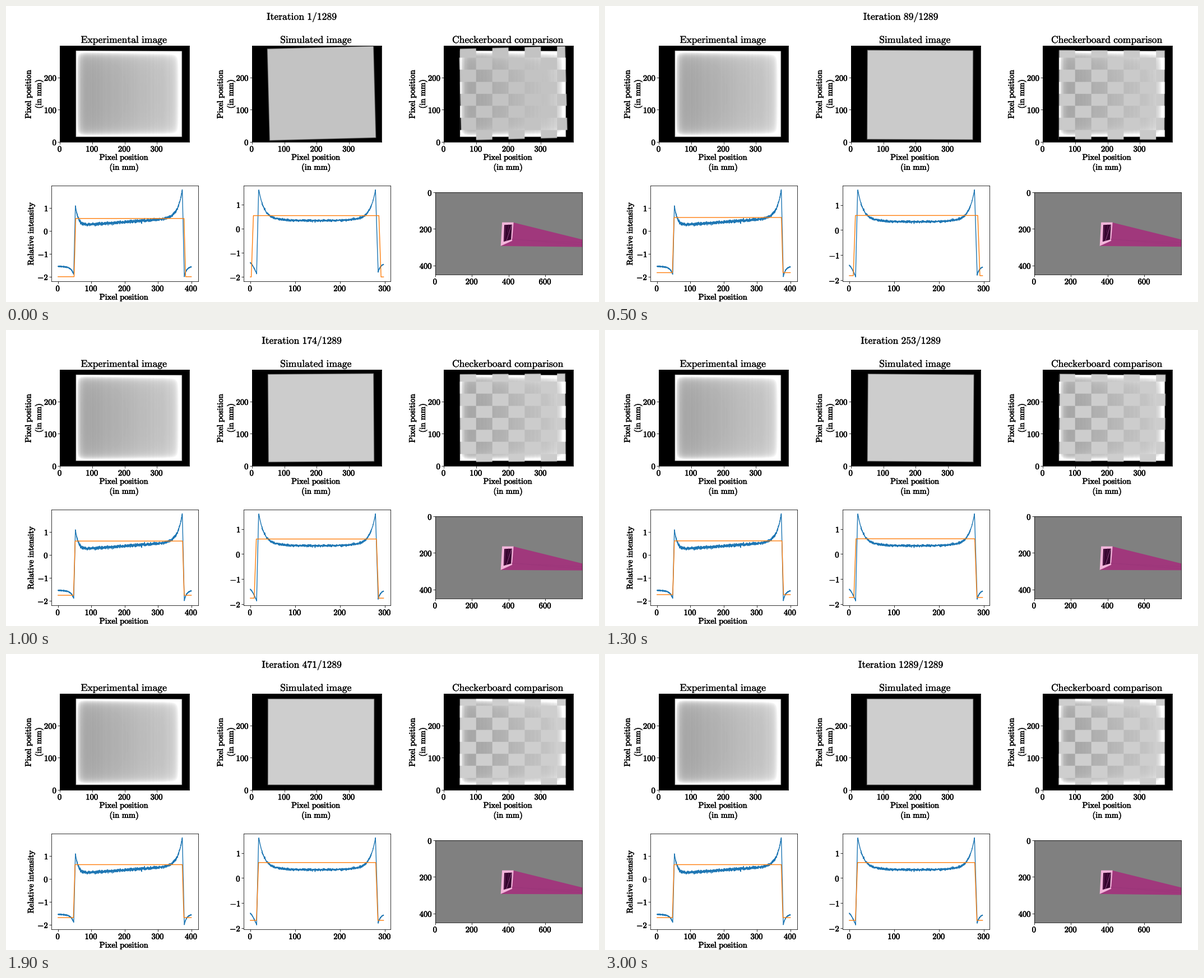
A matplotlib script that plays this animation: 1058 px wide and 529 px high, repeating every 4600 ms.

```python
import numpy as np
import matplotlib.pyplot as plt
from matplotlib.animation import FuncAnimation
from matplotlib.patches import Polygon
from matplotlib.patheffects import withStroke
from matplotlib.ticker import FuncFormatter, MultipleLocator

W, H, DPI = 1058, 529, 92
PT = 72 / DPI                      # points per pixel
BASE, LARGE = 14.65 * PT, 17.6 * PT
plt.rcParams.update({"mathtext.fontset": "cm", "font.size": BASE,
                     "axes.linewidth": 0.8 * PT})

# Pose of the simulated panel in mm, profile edges and profile levels
STEPS = [0, 3, 8, 13, 19]
POSE = {
    "cx": [214.7, 214.3, 211.7, 214.9, 213.0],
    "cy": [150.8, 143.3, 149.4, 148.8, 148.8],
    "w": [328.0, 326.4, 325.5, 326.9, 327.8],
    "h": [283.6, 277.9, 272.7, 270.1, 266.1],
    "tilt": [-0.026, 0.017, -0.016, 0.007, 0.001],
    "left": [50.5, 48.5, 48.5, 49.5, 48.5],
    "right": [380.5, 375.7, 375.5, 377.2, 375.3],
    "top": [4.5, 12.0, 10.0, 12.5, 16.0],
    "bottom": [289.0, 291.5, 284.5, 282.0, 282.0],
    "low": [-2.0, -1.85, -1.78, -1.735, -1.69],
    "high": [0.54, 0.575, 0.595, 0.61, 0.62],
    "gray": [0.763, 0.786, 0.794, 0.802, 0.808],
}
COUNT = ([0, 3, 8, 13, 19, 26, 30], [1, 67, 122, 253, 471, 1039, 1289])
SPAN_X, SPAN_Y = 400, 298
LAST = 30

rng = np.random.default_rng(4)
fig = plt.figure(figsize=(W / DPI, H / DPI), dpi=DPI, facecolor="white")


def tex(s):
    return r"$\mathrm{" + s.replace(" ", r"\ ") + "}$"


def weight(width):
    return [withStroke(linewidth=width * PT, foreground="black")]


def label(x, y, s, size=BASE, **kw):
    opts = dict(ha="center", va="baseline", fontsize=size,
                path_effects=weight(0.6 if size == BASE else 0.35))
    opts.update(kw)
    return fig.text(x / W, 1 - y / H, tex(s), **opts)


def side_label(x, y, s):
    label(x, y, s, rotation=90, va="center")


def thicken_ticks(ax):
    for text in ax.get_xticklabels() + ax.get_yticklabels():
        text.set_path_effects(weight(0.6))


def panel(x0, y0, x1, y1, xstep, ystep):
    ax = fig.add_axes([x0 / W, 1 - y1 / H, (x1 - x0) / W, (y1 - y0) / H])
    number = FuncFormatter(lambda v, _: f"${v:g}$")
    for axis, step in ((ax.xaxis, xstep), (ax.yaxis, ystep)):
        axis.set_major_locator(MultipleLocator(step))
        axis.set_major_formatter(number)
    ax.tick_params(length=3.5 * PT, width=0.8 * PT)
    ax.tick_params(axis="x", pad=2 * PT)
    ax.tick_params(axis="y", pad=1.5 * PT)
    return ax


def image_panel(x0, title, data):
    ax = panel(x0, 71.3, x0 + 230.6, 242.7, 100, 100)
    img = ax.imshow(data, cmap="gray", vmin=0, vmax=1, aspect="auto",
                    extent=(0, SPAN_X, 0, SPAN_Y))
    ax.set_xlim(0, SPAN_X - 0.1)
    thicken_ticks(ax)
    mid = x0 + 114.6
    label(mid, 66, title, LARGE)
    label(mid, 275, "Pixel position")
    label(mid, 292.6, "(in mm)")
    side_label(x0 - 56, 157, "Pixel position")
    side_label(x0 - 37.5, 157, "(in mm)")
    return img


X, Y = np.meshgrid(np.arange(SPAN_X) + 0.5, SPAN_Y - np.arange(SPAN_Y) - 0.5)
row = ((SPAN_Y - Y) // (SPAN_Y / 8)).astype(int)
col = (X // (SPAN_X / 8)).astype(int)
CHECKER = (row + col) % 2 == 1


def inside(d, soft=2.0):
    return np.clip(d / soft + 0.5, 0, 1)


def measured_image():
    top = 282.5 - 0.004 * (X - 50)
    dl, dr, db, dt = X - 50, 377 - X, Y - 16, top - Y
    g = 0.645 + 0.12 * np.clip((X - 80) / 240, 0, 1)
    g += 0.05 * np.abs((Y - 149) / 133) ** 3
    for d, amp, fade in ((dl, 0.45, 9), (dr, 0.5, 12), (db, 0.5, 8), (dt, 0.5, 8)):
        g += amp * np.exp(-np.clip(d, 0, None) / fade)
    stripes = np.repeat(rng.normal(0, 0.004, SPAN_X // 4), 4)
    g = np.clip(g + stripes, 0, 1)
    return g * inside(np.minimum(np.minimum(dl, dr), np.minimum(db, dt)))


def simulated_image(p):
    c, s = np.cos(p["tilt"]), np.sin(p["tilt"])
    dx, dy = X - p["cx"], Y - p["cy"]
    u, v = c * dx - s * dy, s * dx + c * dy
    edge = np.minimum(p["w"] / 2 - np.abs(u), p["h"] / 2 - np.abs(v))
    return p["gray"] * inside(edge, 3.0)


def row_profile(x):
    before = -1.55 - 0.35 * np.exp((x - 47) / 9)
    plate = (0.26 + 0.00105 * (x - 80) + 0.88 * np.exp(-(x - 52) / 8.5)
             + 1.23 * np.exp((x - 373) / 14))
    after = -1.55 - 0.45 * np.exp(-(x - 379) / 7)
    rise = np.interp(x, [47, 52], [-1.9, 1.13])
    fall = np.interp(x, [373, 379], [1.8, -2.0])
    y = np.select([x < 47, x < 52, x < 373, x < 379], [before, rise, plate, fall], after)
    flat = (x > 56) & (x < 365)
    return y + rng.normal(0, 1, x.size) * np.where(flat, 0.03, 0.012)


def column_profile(x):
    def spike(d):
        return 1.15 * np.exp(-d / 11.5) + 0.15 * np.exp(-d / 50)
    before = -1.42 - 0.44 * np.clip(x / 14, 0, 1) ** 1.4
    plate = 0.31 + spike(np.abs(x - 19)) + spike(np.abs(279 - x))
    after = -1.43 - 0.37 * np.exp(-(x - 285) / 6)
    rise = np.interp(x, [14, 18.5], [-1.87, 1.61])
    fall = np.interp(x, [279, 285], [1.61, -1.8])
    y = np.select([x < 14, x < 18.5, x < 279, x < 285], [before, rise, plate, fall], after)
    flat = (x > 26) & (x < 272)
    return y + rng.normal(0, 1, x.size) * np.where(flat, 0.022, 0.01)


def box_line(a, b, end, p):
    xs = [0, a - 2.4, a + 2.4, b - 2.4, b + 2.4, end]
    lo, hi = p["low"], p["high"]
    return xs, [lo, lo, hi, hi, lo, lo]


def plot_panel(x0, profile, end):
    ax = panel(x0, 320.7, x0 + 261.5, 492, 100, 1)
    x = np.linspace(0, end, end * 4)
    y = profile(x)
    ax.plot(x, y, color="C0", lw=1.4 * PT)
    line, = ax.plot([], [], color="C1", lw=1.4 * PT)
    ax.set_xlim(-0.05 * end, 1.05 * end)
    return ax, line, y


measured = measured_image()
image_panel(96.3, "Experimental image", measured)
sim_img = image_panel(438.9, "Simulated image", measured)
mix_img = image_panel(781.3, "Checkerboard comparison", measured)
title = label(528.2, 24.5, "Iteration 1/1289", LARGE)

ax_row, row_line, _ = plot_panel(81, row_profile, 400)
ax_row.set_ylim(-2.2, 1.98)
thicken_ticks(ax_row)
side_label(45, 406.5, "Relative intensity")
label(211, 524.8, "Pixel position")
ax_col, col_line, col_data = plot_panel(424, column_profile, 297)

# 3D preview, laid out in stage pixels
scene = panel(766, 333, 1027.5, 479.7, 200, 200)
scene.set_facecolor("#808080")
scene.set_xlim(0, 799.5)
scene.set_ylim(449.5, 0)
thicken_ticks(scene)


def to_scene(points):
    return [((x - 766) * 800 / 262, (y - 333) * 450 / 147) for x, y in points]


def shape(points, color, **kw):
    patch = Polygon(to_scene(points), closed=True, fc=color, ec="none", **kw)
    return scene.add_patch(patch)


def stroke(points, color, width):
    x, y = zip(*to_scene(points))
    scene.plot(x, y, color=color, lw=width * PT)


beam = shape([(905, 387)] * 4, "#a0387c")
for y in (421, 425):
    stroke([(903, 417), (1029, y + 2)], "#9b367a", 0.8)
shape([(885.3, 386.7), (905.8, 386.7), (903.2, 419.8), (882.8, 429)], "#f2b4da")
shape([(889.2, 391.3), (903, 390.7), (901.2, 417.6), (888, 421.3)], "#36062f")
stroke([(891.5, 392), (889.5, 420)], "#7a2a66", 0.8)
stroke([(902, 392), (893, 420)], "#a8609a", 0.7)
stroke([(897, 391), (895.5, 405)], "#5c1c4e", 0.8)


def update(i):
    t = min(i, LAST)
    p = {k: np.interp(t, STEPS, v) for k, v in POSE.items()}
    title.set_text(tex(f"Iteration {round(np.interp(t, *COUNT))}/1289"))

    sim = simulated_image(p)
    sim_img.set_data(sim)
    mix_img.set_data(np.where(CHECKER, sim, measured))

    row_line.set_data(*box_line(p["left"], p["right"], 400, p))
    col_line.set_data(*box_line(p["top"], p["bottom"], 297, p))
    lo, hi = min(col_data.min(), p["low"]), col_data.max()
    pad = 0.05 * (hi - lo)
    ax_col.set_ylim(lo - pad, hi + pad)
    thicken_ticks(ax_col)

    base = np.interp(t, [0, 8, 13, 19, 26, 30], [430.7, 430, 429.4, 429.4, 430.2, 430.7])
    beam.set_xy(to_scene([(905.5, 387), (1030, 417.8), (1030, base), (883, 429)]))
    return []


anim = FuncAnimation(fig, update, frames=46, interval=100, repeat=True,
                     repeat_delay=0, blit=False)
plt.show()
```
